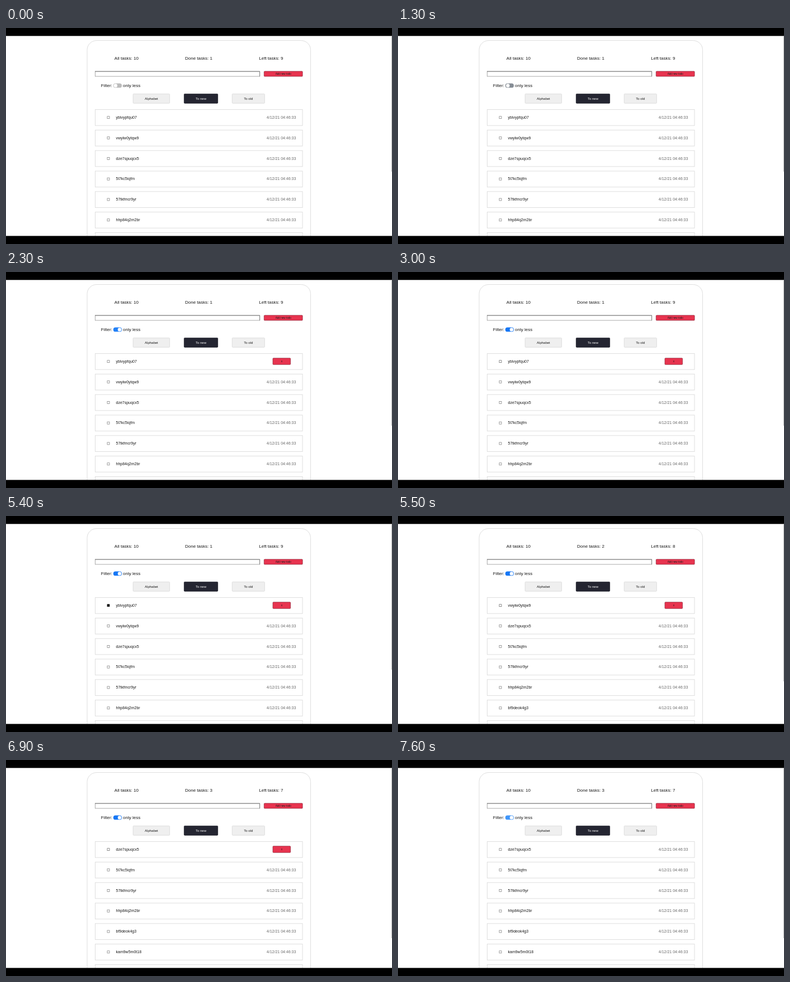
An HTML page that plays this animation: 690x388 px, repeating every 8000 ms.

```html
<!DOCTYPE html>
<html lang="en">
<head>
<meta charset="utf-8">
<title>Task list</title>
<style>
  html, body { margin: 0; width: 100%; height: 100%; overflow: hidden; background: #fff; }
  svg { display: block; width: 100%; height: 100%; font: 7px "Liberation Sans", Arial, sans-serif; fill: #181818; }
  .frame { fill: #fff; stroke: #dedede; stroke-width: 1; }
  .middle { text-anchor: middle; }
  .end { text-anchor: end; fill: #686868; }
  .large { font-size: 8px; }
  .small { font-size: 6px; }
  .tiny { font-size: 4.6px; }
  .sort { fill: #efefef; stroke: #d8d8d8; stroke-width: .8; }
  .active { fill: #242531; stroke: #191a24; }
  .red { fill: #e7344f; stroke: #8c2638; stroke-width: .7; }
</style>
</head>
<body>
<svg viewBox="0 0 690 388" id="stage"></svg>
<script>
const LOOP = 8000, ROWS = 6, ROW_TOP = 146.5, ROW_STEP = 36.83;
const tasks = ['yblvypfqu07', 'vwylw0ytqw9', 'dze7spuqcx5', '5l7kc5iqfm',
  '57tkfmcr9yr', 'hhp84q2m2br', 'bf9deok4g3', 'kam9w5m0t18'];

const text = (x, y, label, cls = '', extra = '') =>
  `<text x="${x}" y="${y}" class="${cls}" ${extra}>${label}</text>`;
const rect = (x, y, w, h, extra = '') =>
  `<rect x="${x}" y="${y}" width="${w}" height="${h}" ${extra}/>`;
const sortButton = (x, w, label, active) =>
  rect(x, 118.4, w, 16.8, `rx="1" class="sort ${active ? 'active' : ''}"`) +
  text(x + w / 2, 128.7, label, 'middle small', active ? 'style="fill:#fff"' : '');

const row = i => {
  const y = ROW_TOP + i * ROW_STEP;
  return rect(159.5, y, 370.5, 28.7, 'class="frame"') +
    rect(181, y + 12.2, 4, 4, `id="check${i}" fill="#fff" stroke="#777" stroke-width=".7"`) +
    text(196.5, y + 16.5, '', '', `id="task${i}"`) +
    text(518.4, y + 16.5, '4/12/21 04:46:33', 'end', `id="date${i}"`);
};

document.getElementById('stage').innerHTML =
  rect(0, 0, 690, 388, 'fill="#fff"') +
  rect(145, 22.5, 399.5, 400, 'rx="17" class="frame"') +
  text(193.8, 57.3, 'All tasks: 10', 'large') +
  text(320, 57.3, '', 'large', 'id="done"') +
  text(452.3, 57.3, '', 'large', 'id="left"') +
  rect(159.4, 78, 294.2, 8.9, 'fill="#fff" stroke="#a2a2a2" stroke-width=".9"') +
  '<path d="M159 78H453.6V87" fill="none" stroke="#777" stroke-width=".9"/>' +
  rect(461.3, 77.8, 68.8, 9.1, 'rx="1" class="red"') +
  text(495.8, 83.9, 'Add new todo', 'middle tiny') +
  text(169.8, 105.7, 'Filter:', 'large') +
  rect(191.8, 99.5, 15.2, 7.8, 'rx="3.9" id="track"') +
  '<circle id="knob" cy="103.4" r="3.2" fill="#fff"/>' +
  text(209, 105.7, 'only less', 'large') +
  sortButton(227.2, 65.4, 'Alphabet') +
  sortButton(318.4, 60.2, 'To new', true) +
  sortButton(404.3, 58, 'To old') +
  Array.from({ length: ROWS + 1 }, (_, i) => row(i)).join('') +
  `<g id="remove">${rect(477, 154.7, 31.6, 11.6, 'rx="1" class="red"')}${text(492.8, 162, 'x', 'middle tiny')}</g>` +
  rect(689, 15, 1, 243, 'id="thumb" fill="#b9b9b9"') +
  rect(0, 0, 690, 14.3, 'fill="#000"') +
  rect(0, 373.5, 690, 15, 'fill="#000"');

const el = id => document.getElementById(id);
const set = (id, name, value) => el(id).setAttribute(name, value);
const ease = (t, start, length) => {
  const p = Math.min(1, Math.max(0, (t - start) / length));
  return p * p * (3 - 2 * p);
};
const mix = (a, b, p) => a.map((v, i) => v + (b[i] - v) * p);
const between = (t, a, b) => t >= a && t < b;

function draw(t) {
  const removed = t < 5500 ? 0 : t < 6900 ? 1 : 2;
  el('done').textContent = 'Done tasks: ' + (1 + removed);
  el('left').textContent = 'Left tasks: ' + (9 - removed);

  const on = ease(t, 1260, 240);
  const hover = ease(t, 560, 150) - ease(t, 2150, 240) + ease(t, 7400, 200);
  const off = mix([187, 187, 187], [140, 140, 140], hover);
  const blue = mix([22, 119, 245], [64, 150, 250], hover);
  set('track', 'fill', `rgb(${mix(off, blue, on).map(Math.round)})`);
  set('knob', 'cx', 195.8 + 7.2 * on);

  for (let i = 0; i < ROWS; i++) el('task' + i).textContent = tasks[i + removed];
  const rowHover = between(t, 2300, 7400);
  el('remove').style.display = rowHover ? '' : 'none';
  el('date0').style.display = rowHover ? 'none' : '';

  const checked = between(t, 5400, 5500) || between(t, 6700, 6900);
  set('check0', 'fill', checked ? '#111' : '#fff');
  set('check0', 'stroke', checked ? '#111' : between(t, 2600, 7400) ? '#606060' : '#777');

  const thumbEnd = t < 1400 ? 258 : [276, 297, 320][removed];
  set('thumb', 'height', thumbEnd - 15);
}

function tick() {
  draw(performance.now() % LOOP);
  requestAnimationFrame(tick);
}
tick();
</script>
</body>
</html>
```
